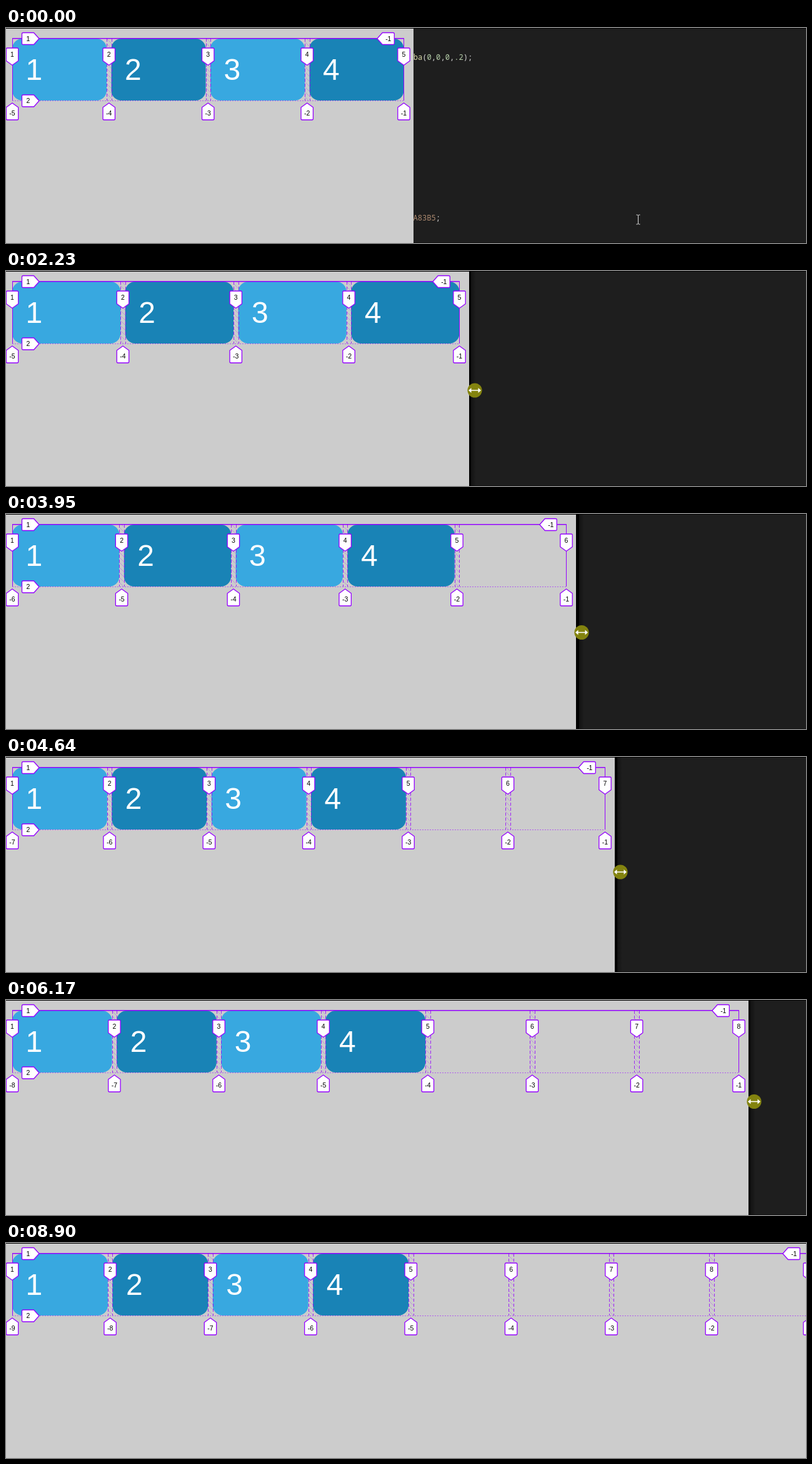
An HTML page for the animation above (9.25 s loop, 1280 by 344 pixels).

```html
<!DOCTYPE html>
<html lang="en">
<head>
<meta charset="utf-8">
<title>Grid auto-fill resize</title>
<style>
  html, body { margin: 0; width: 100%; height: 100%; overflow: hidden; background: #1e1e1e; }
  svg { display: block; width: 1280px; height: 344px; }
  .code { font: 12.1px "Noto Sans Mono", "DejaVu Sans Mono", monospace; fill: #d4d4d4; white-space: pre; }
  .num { fill: #b5cea8; }
  .fn { fill: #dcdcaa; }
  .val { fill: #ad8a70; }
  .digit { font: 48px "Liberation Sans", Arial, sans-serif; fill: #fff; }
  .tag path { fill: #fff; stroke: #9400ff; stroke-width: 1.3; stroke-linejoin: round; }
  .tag text { font: 10.5px "Liberation Sans", Arial, sans-serif; text-anchor: middle; fill: #000; }
  .line { fill: none; stroke: #9400ff; }
  .dash { fill: none; stroke: #9400ff; stroke-dasharray: 5 3; opacity: .8; }
  .dots { fill: none; stroke: #a83cf5; stroke-dasharray: 2 2; opacity: .8; }
</style>
</head>
<body>
<svg viewBox="0 0 1280 344">
  <defs>
    <pattern id="hatch" width="8" height="8" patternUnits="userSpaceOnUse">
      <path d="M-1 -1L9 9" stroke="#9400ff" opacity=".28"/>
    </pattern>
    <linearGradient id="shade">
      <stop offset="0" stop-color="#000" stop-opacity=".4"/>
      <stop offset="1" stop-color="#000" stop-opacity="0"/>
    </linearGradient>
  </defs>
  <rect width="1280" height="344" fill="#1e1e1e"/>
  <rect y="343" width="1280" height="1" fill="#121212"/>
  <text class="code" x="651.8" y="51"><tspan class="fn">ba</tspan>(<tspan class="num">0</tspan>,<tspan class="num">0</tspan>,<tspan class="num">0</tspan>,<tspan class="num">.2</tspan>);</text>
  <text class="code" x="651.5" y="308"><tspan class="val">A83B5</tspan>;</text>
  <g id="scene"></g>
  <rect width="1280" height="1" fill="#000"/>
  <g id="pointer"></g>
</svg>
<script>
const LOOP = 9250, STEP = 171.3;
const LEFT = 10, TOP = 17, BOTTOM = 116, GAP = 7.5, MIN_COL = 145, PAD = 15.5;
const scene = document.getElementById('scene');
const pointer = document.getElementById('pointer');

// step, pane edge, width of the unpainted strip, pointer y
const DRAG = [
  [6, 652, 0, 188], [7, 662, 3, 188], [13, 741, 3, 191], [20, 850, 4, 190],
  [23, 912, 5, 189.5], [27, 974, 4, 184], [31, 1024, 8, 176], [34, 1104, 4, 168],
  [36, 1188, 3, 162.5], [41, 1246, 3, 172], [43, 1266, 3, 175.5], [45, 1301, 3, 180]
];
// pointer coming back at the corner: step, x, y
const RETURN = [[48, 1272, 326], [49, 1267, 305], [50, 1264, 293], [51, 1270, 316]];

const f = n => Math.round(n * 100) / 100;

function sample(keys, k) {
  if (k <= keys[0][0]) return keys[0].slice(1);
  const i = keys.findIndex(key => key[0] > k);
  if (i < 0) return keys[keys.length - 1].slice(1);
  const a = keys[i - 1], b = keys[i], p = (k - a[0]) / (b[0] - a[0]);
  return a.slice(1).map((v, j) => v + (b[j + 1] - v) * p);
}

function columns(right) {
  const span = right - LEFT + GAP;
  const count = Math.floor(span / (MIN_COL + GAP));
  return { count, pitch: span / count, width: span / count - GAP };
}

const rect = (x, y, w, h, fill, extra = '') =>
  `<rect x="${f(x)}" y="${y}" width="${f(w)}" height="${h}" fill="${fill}" ${extra}/>`;
const stroke = (cls, d) => `<path class="${cls}" d="${d}"/>`;

function tag(x, y, path, text, tx, ty) {
  return `<g class="tag" transform="translate(${f(x)} ${y})"><path d="${path}"/>` +
    `<text x="${tx}" y="${ty}">${text}</text></g>`;
}
const DOWN = 'M-8 0H8Q9.7 0 9.7 2V20.5L0 27.5L-9.7 20.5V2Q-9.7 0 -8 0Z';
const UP = 'M0 0L9.7 7V25Q9.7 27 8 27H-8Q-9.7 27 -9.7 25V7Z';
const EAST = 'M2 -9.5H19L27.5 0L19 9.5H2Q0 9.5 0 7.5V-7.5Q0 -9.5 2 -9.5Z';
const WEST = 'M-2 -9.5H-19L-27.5 0L-19 9.5H-2Q0 9.5 0 7.5V-7.5Q0 -9.5 -2 -9.5Z';

function cards(right) {
  const { pitch, width } = columns(right);
  let out = '';
  for (let i = 0; i < 4; i++) {
    const x = LEFT + i * pitch;
    out += rect(x, TOP, width, BOTTOM - TOP, i % 2 ? '#1983b6' : '#38a8e0', 'rx="16"') +
      `<text class="digit" x="${f(x + 21.5)}" y="83">${i + 1}</text>`;
  }
  return out;
}

function overlay(right) {
  const { count, pitch, width } = columns(right);
  let lines = '', tags = '';
  for (let i = 0; i <= count; i++) {
    const end = LEFT + i * pitch - GAP;
    const inner = i > 0 && i < count;
    const x = i === 0 ? LEFT : i === count ? right : end + GAP / 2;
    if (inner) {
      const a = Math.round(end) + .5, b = Math.round(end + GAP) + .5;
      lines += rect(end, TOP, GAP, BOTTOM - TOP, 'url(#hatch)') +
        stroke('dash', `M${a} ${TOP}V${BOTTOM}M${b} ${TOP}V${BOTTOM}`);
    }
    tags += tag(x, 32, DOWN, i + 1, 0, 13.8) +
      tag(x, 120, UP, i - count - 1, 0, 20.3);
  }
  const r = Math.floor(right) + .5;
  lines += stroke('dots', `M${LEFT} 116.5H${r}`) +
    stroke('line', `M10.5 ${BOTTOM}V16.5H${r}V${BOTTOM}`) +
    rect(LEFT, 16, right - LEFT, 1.5, '#9400ff');
  tags += tag(25.5, 17, EAST, 1, 10, 3.8) + tag(25.5, 116.5, EAST, 2, 10, 3.8) +
    tag(right - 15.2, 17, WEST, -1, -9.5, 3.8);
  return lines + tags;
}

const at = (x, y, body) => `<g transform="translate(${f(x)} ${f(y)})">${body}</g>`;
const IBEAM = '<path d="M-3 -7.5H-1L0 -6.5L1 -7.5H3M0 -6.5V6.5M-3 7.5H-1L0 6.5L1 7.5H3" fill="none" stroke="#ddd"/>';
const RESIZE = '<circle r="11.6" fill="#83830f"/>' +
  '<path d="M-10 0L-5.5 -4V-.8H5.5V-4L10 0L5.5 4V.8H-5.5V4Z" fill="#fff"/>';
const ARROW = '<path d="M0 0V16L3.7 12.6L6.2 18.3L8.6 17.2L6.1 11.7H11.3Z" fill="#fff" stroke="#000" stroke-width=".8"/>';

function drawPointer(k, edge, lead, y) {
  if (k < 4) {
    const p = [0, .15, .5, .85][k];
    return at(1011.5 - 353 * p, 306.5 - 118 * p, IBEAM);
  }
  if (k <= 45) return at(edge + lead + Math.min(9, Math.max(6, k)), y, RESIZE);
  const back = RETURN.find(r => r[0] === k);
  return back ? at(back[1], back[2], ARROW) : '';
}

function draw(k) {
  const [edge, strip, y] = sample(DRAG, k);
  const lead = strip > 6 ? strip : 0;   // page repaints ahead of the overlay on slow steps
  scene.innerHTML = rect(0, 0, edge, 344, '#ccc') +
    rect(edge, 0, strip, 344, '#000') +
    (strip ? rect(edge + strip, 0, 8, 344, 'url(#shade)') : '') +
    cards(edge + lead - PAD) + overlay(edge - PAD);
  pointer.innerHTML = drawPointer(k, edge, lead, y);
}

const start = performance.now();
let last = -1;
function tick() {
  const t = (performance.now() - start) % LOOP;
  const k = Math.min(53, Math.floor((t + 15) / STEP));
  if (k !== last) draw(last = k);
  requestAnimationFrame(tick);
}
tick();
</script>
</body>
</html>
```
